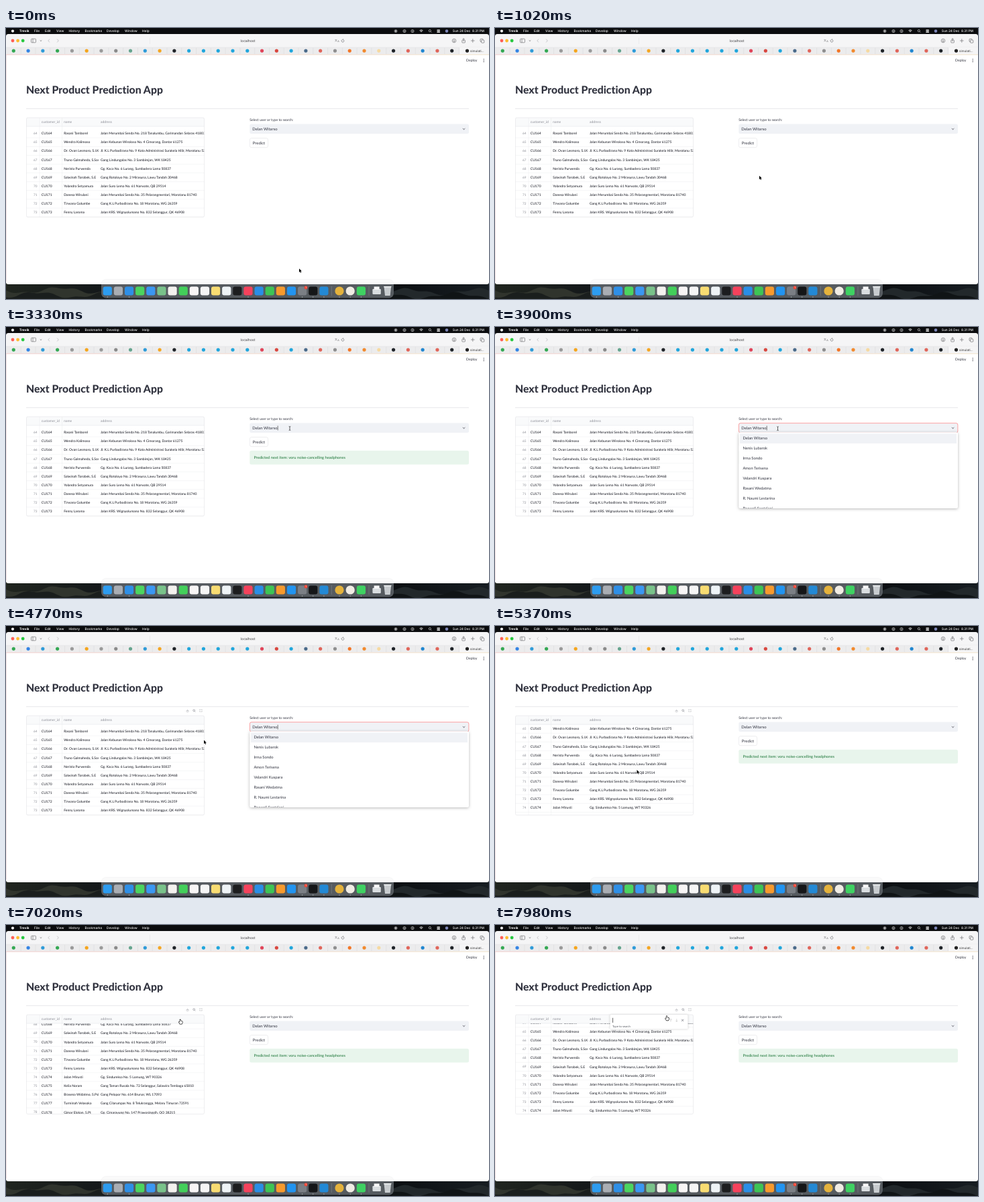
An HTML page with a canvas that plays this animation: 720x405 px, repeating every 8000 ms.

```html
<!DOCTYPE html>
<html lang="en">
<head>
<meta charset="utf-8">
<title>Next Product Prediction App</title>
<style>
html, body { margin: 0; width: 100%; height: 100%; overflow: hidden; background: #fff; }
canvas { display: block; width: 720px; height: 405px; }
</style>
</head>
<body>
<canvas id="stage"></canvas>
<script>
const W = 720, H = 405, LOOP = 8000;
const canvas = document.getElementById('stage');
const g = canvas.getContext('2d');
const dpr = window.devicePixelRatio || 1;
canvas.width = W * dpr;
canvas.height = H * dpr;

const LATO = 'Lato, "Open Sans", sans-serif';
const UI = 'Inter, Roboto, sans-serif';
const INK = '#31333f', DARK = '#20222b', RED = '#ff4b4b', FIELD = '#f0f2f6', CHROME = '#f5f5f6';

const USER = 'Delan Witarso';
const FIRST = 64, ROW = 13.125;
const rows = [
  ['Rasani Tamborel', 'Jalan Merumbai Senda No. 218 Tanalumbu, Garimandan Selaras 41803'],
  ['Wendra Kalimoso', 'Jalan Kebunan Wiroloso No. 4 Cimorang, Dantar 61275'],
  ['Dr. Ovan Lesmoro, S.I.Kom', 'Jl. K.L Purbodirana No. 9 Kota Administrasi Surakela Hilir, Morotanu 52816'],
  ['Truno Galmaheda, S.Sos', 'Gang Lindungalas No. 3 Sambirejan, WK 18425'],
  ['Nerista Purwenda', 'Gg. Kaca No. 6 Lurang, Sumbadera Lama 50837'],
  ['Salwinah Torobek, S.E', 'Gang Rotoloyo No. 2 Mirasuna, Lawu Tandah 30468'],
  ['Yolandra Setyamura', 'Jalan Suro Lema No. 61 Narwate, QB 29514'],
  ['Danesa Wirulani', 'Jalan Merumbai Senda No. 35 Pelarangmentari, Morotanu 81740'],
  ['Tirwana Golumbe', 'Gang K.L Purbodirana No. 18 Morotanu, WG 26359'],
  ['Fenny Laroma', 'Jalan KRS. Wignyolumano No. 832 Selanggur, QK 46908'],
  ['Jolan Mirusti', 'Gg. Sindureksa No. 5 Lomung, WT 90326'],
  ['Kelia Noram', 'Gang Taman Rusala No. 72 Selanggur, Salawira Tembaga 65810'],
  ['Brasena Widatmo, S.Psi', 'Gang Pelopor No. 614 Brunar, WL 17093'],
  ['Turminah Velasoka', 'Gang Cilarumpas No. 8 Telukrangga, Melaru Timuran 72591'],
  ['Gimar Elokan, S.Pt', 'Gg. Cimarayung No. 147 Prawosinggih, QO 38215'],
  ['Lestuti Margonesa', 'Jl. Letnan Wirasuta No. 3 Randumelih, WB 41657'],
  ['Tgk. Rumani Besarowo', 'Jl. Cilarumpas No. 9 Lomuhon, WT 20846'],
  ['Kirnawa Sadelumo, M.Ak', 'Jl. KH Ruwan Dasela No. 20 Kunjar, QC 93148'],
  ['Imelra Katunsi', 'Gg. Kebunan Wiroloso No. 71 Lau-Rau, WI 56230'],
  ['Yuni Parobek', 'Jalan Pelopor No. 7 Wagerang, Morotanu 13874'],
  ['Gerry Lomasu', 'Jl. Wongsarena No. 265 Lorok, Pasuna 78041']
];
const options = [USER, 'Nenis Lubarok', 'Irma Sondo', 'Amon Terisena', 'Velandri Kuspara',
  'Rasani Wedatma', 'R. Naumi Lestarina', 'Bonardi Septalani'];

// Keyframes: [ms, values...]
const cursorPath = [[480, 437, 359.5], [1290, 379, 172.5], [2700, 379, 172.5], [3200, 423, 151.5],
  [3850, 423, 151.5], [4650, 295, 170.5], [4800, 295, 170.5], [5250, 211.5, 215], [5790, 211.5, 215],
  [6400, 250, 149.2], [6800, 250, 149.2], [7380, 280, 126.5], [7600, 280, 126.5], [7960, 256, 136.5]];
const scrollPath = [[5200, 0], [5370, 17], [5640, 48], [5790, 48], [6430, 138.3], [6650, 138.3], [7300, 11.3]];

const T = { run: 1440, done: 2400, focus: 3300, open: 3390, close: 4950, tools: 4640, search: 7500 };

function track(keys, t) {
  if (t <= keys[0][0]) return keys[0].slice(1);
  for (let i = 1; i < keys.length; i++) {
    const a = keys[i - 1], b = keys[i];
    if (t < b[0]) {
      const p = (t - a[0]) / (b[0] - a[0]);
      const e = p * p * (3 - 2 * p);
      return a.slice(1).map((v, k) => v + (b[k + 1] - v) * e);
    }
  }
  return keys[keys.length - 1].slice(1);
}

function rect(x, y, w, h, color, r = 0) {
  g.fillStyle = color;
  g.beginPath();
  g.roundRect(x, y, w, h, r);
  g.fill();
}

function frame(x, y, w, h, color, r = 0, lw = 0.5) {
  g.strokeStyle = color;
  g.lineWidth = lw;
  g.beginPath();
  g.roundRect(x, y, w, h, r);
  g.stroke();
}

function dot(x, y, r, color) {
  g.fillStyle = color;
  g.beginPath();
  g.arc(x, y, r, 0, 7);
  g.fill();
}

function ring(x, y, r, color, lw = 0.6, from = 0, to = 7) {
  g.strokeStyle = color;
  g.lineWidth = lw;
  g.beginPath();
  g.arc(x, y, r, from, to);
  g.stroke();
}

function line(pts, color, lw = 0.6) {
  g.strokeStyle = color;
  g.lineWidth = lw;
  g.beginPath();
  for (let i = 0; i < pts.length; i += 2) g.lineTo(pts[i], pts[i + 1]);
  g.stroke();
}

function text(s, x, y, size, color = INK, font = LATO, weight = 400, align = 'left') {
  g.font = `${weight} ${size}px ${font}`;
  g.fillStyle = color;
  g.textAlign = align;
  g.fillText(s, x, y + size * 0.34);
}

function clip(x, y, w, h, draw) {
  g.save();
  g.beginPath();
  g.rect(x, y, w, h);
  g.clip();
  draw();
  g.restore();
}

function chevron(x, y, w, h, color, lw = 0.7) {
  line([x - w, y - h, x, y + h, x + w, y - h], color, lw);
}

function lens(x, y, r, color) {
  ring(x - r * 0.3, y - r * 0.3, r, color);
  line([x + r * 0.45, y + r * 0.45, x + r * 1.3, y + r * 1.3], color);
}

function menuBar() {
  rect(0, 0, W, 12, '#0b0c0e');
  dot(10, 4.6, 2.1, '#f2f2f2');
  text('Trevik', 20, 4.6, 4.8, '#fff', UI, 700);
  [['File', 42], ['Edit', 58], ['View', 75], ['History', 93.5], ['Bookmarks', 117.5],
    ['Develop', 150], ['Window', 177], ['Help', 203]]
    .forEach(([s, x]) => text(s, x, 4.6, 4.8, '#f4f4f4', UI, 500));
  const c = '#eee';
  ring(581, 4.6, 2, c);
  dot(581, 4.6, 1.1, c);
  ring(594, 4.6, 2.1, c);
  ring(594, 4.6, 0.9, c, 0.5);
  ring(606, 4.6, 2.1, c);
  line([605.3, 3.6, 607, 4.6, 605.3, 5.6], c);
  [1.2, 2.5, 3.8].forEach(r => ring(619, 6.6, r, c, 0.8, -2.3, -0.85));
  lens(632.3, 4.6, 1.6, c);
  rect(642.3, 2.4, 4.8, 1.8, c, 0.9);
  rect(642.3, 5, 4.8, 1.8, c, 0.9);
  dot(657, 4.6, 2.3, '#7d86b8');
  text('Sun 24 Dec  8.31 PM', 713, 4.6, 4.8, '#f4f4f4', UI, 500, 'right');
}

function toolbar() {
  rect(0, 9, W, 40, CHROME, [3.5, 3.5, 0, 0]);
  ['#ff5f57', '#febc2e', '#28c840'].forEach((c, i) => dot(10 + i * 7.6, 19, 2.4, c));
  const c = '#5c5c5e', pale = '#b4b4b6';
  frame(37.5, 16.2, 7, 5.6, c, 1, 0.6);
  line([40, 16.2, 40, 21.8], c);
  chevron(52, 19, 1.3, 0.6, c);
  line([65, 16.6, 62.8, 19, 65, 21.4], pale, 0.7);
  line([76.2, 16.6, 78.4, 19, 76.2, 21.4], pale, 0.7);
  line([214.5, 14.5, 214.5, 24], '#e4e4e6');
  text('localhost', 360.5, 19, 5.1, '#3c3c3e', UI, 400, 'center');
  text('文', 490, 18.8, 3.8, c, '"Noto Sans CJK SC", "Noto Sans CJK", sans-serif');
  text('A', 494.3, 19.5, 3.6, c, UI);
  ring(502, 19.2, 1.9, c, 0.6, -0.6, 4.6);
  line([502, 16.4, 503.3, 17.3, 502, 18.2], c, 0.5);
  ring(668, 19, 2.8, c);
  line([668, 17.4, 668, 20.4], c);
  chevron(668, 19.9, 1.1, 0.5, c);
  frame(679.8, 18, 4.6, 4, c, 0.7, 0.6);
  line([682.1, 20, 682.1, 15.6], c);
  line([680.8, 16.8, 682.1, 15.5, 683.4, 16.8], c);
  line([693, 19, 698.6, 19], c);
  line([695.8, 16.2, 695.8, 21.8], c);
  frame(707, 16.3, 4.2, 4.2, c, 0.8, 0.6);
  rect(708.4, 17.8, 4.6, 4.6, CHROME, 0.8);
  frame(708.6, 18, 4.2, 4.2, c, 0.8, 0.6);
}

const tabColors = ['#34a853', '#3584e4', '#2f9bd8', '#34a853', '#9a9a9a', '#f5a51d', '#9a9a9a', '#8a8a8a',
  '#66a58f', '#2f9bd8', '#f5a623', '#1f2328', '#20a6dc', '#20a6dc', '#20a6dc', '#20a6dc', '#20a6dc', '#e0455a',
  '#d9473f', '#20a6dc', '#4a6a8a', '#e0655a', '#8f8f8f', '#f37626', '#f28a2e', '#f6d9a0', '#1f2328', '#e0655a',
  '#1f86d0', '#e0655a', '#1f2328'];

function tabs() {
  rect(0, 29, W, 10.5, '#ececed');
  line([0, 29, W, 29], '#dedee0', 0.5);
  tabColors.forEach((c, i) => {
    const x = 11.3 + i * 21.78;
    dot(x, 34.1, 2.6, c);
    line([x + 10.9, 29.5, x + 10.9, 39], '#d8d8da', 0.5);
  });
  rect(676, 29, 44, 11, CHROME);
  dot(687.5, 34.1, 2.6, '#222');
  text('simulati...', 692, 34.1, 4.6, '#333', UI);
}

function pageHead(t) {
  rect(0, 39.5, W, 343.5, '#fff', [0, 0, 3.5, 3.5]);
  const bar = g.createLinearGradient(0, 0, W, 0);
  bar.addColorStop(0, '#e9b9b9');
  bar.addColorStop(1, '#ecd9b8');
  rect(0, 39.4, W, 0.9, bar);
  rect(0, 40, 0.7, 339, '#ecd4d6');
  text('Deploy', 686, 48.5, 5.2);
  [-1.9, 0, 1.9].forEach(d => dot(712.2, 48.5 + d, 0.6, INK));
  if (t >= T.run && t < T.done) {
    const c = '#8d8f98', k = Math.floor(t / 130) % 2 ? 1 : -1;
    dot(626, 45.3, 0.9, c);
    line([622.6, 47 - k * 0.4, 626, 47.2, 629.4, 47 + k * 0.4], c, 0.8);
    line([626, 46.5, 626, 49.5], c, 1);
    line([625 - k * 0.3, 52.6, 626, 49.4, 627 - k * 0.3, 52.6], c, 0.8);
    text('RUNNING...', 634, 48.5, 4.5, '#a3a5ad');
    text('Stop', 666, 48.5, 5.2);
  }
  text('Next Product Prediction App', 30, 92.6, 15.8, INK, LATO, 800);
  line([30, 120.6, 690, 120.6], '#d8d9dd', 0.6);
}

function searchPanel() {
  g.save();
  g.shadowColor = 'rgba(0,0,0,.22)';
  g.shadowBlur = 3 * dpr;
  rect(171.5, 134, 116, 21.5, '#fff', 1.5);
  g.restore();
  line([175.6, 138.8, 175.6, 146], '#222', 0.7);
  text('Type to search', 175, 151.4, 4.2, '#55575f');
  const c = '#777982';
  line([262, 144.5, 262, 140.5], '#bbb');
  line([260.7, 141.8, 262, 140.4, 263.3, 141.8], '#bbb');
  line([270.8, 140.3, 270.8, 144.4], '#bbb');
  line([269.5, 143.1, 270.8, 144.5, 272.1, 143.1], '#bbb');
  line([278, 140.8, 281.2, 144], c, 0.8);
  line([281.2, 140.8, 278, 144], c, 0.8);
}

function table(t) {
  const s = track(scrollPath, t)[0];
  const grid = '#e9eaed', dim = '#8b8d96';
  const cell = (str, x, y) => text(str, x, y, 5, DARK, LATO, 500);
  clip(30.5, 147, 265, 135.5, () => {
    rows.forEach(([name, addr], i) => {
      const y = 157.5 + i * ROW - s, id = FIRST + i;
      if (y < 138 || y > 292) return;
      line([30, y + 6.56, 296, y + 6.56], grid, 0.45);
      text(id, 46.6, y, 4.8, dim, LATO, 400, 'right');
      cell('CU1' + id, 52.8, y);
      clip(84, 140, 54.2, 145, () => cell(name, 86.2, y));
      cell(addr, 141, y);
    });
  });
  rect(30.5, 134, 265, 13, '#f9fafb');
  text('customer_id', 52.8, 140.4, 5, dim);
  text('name', 86.2, 140.4, 5, dim);
  text('address', 141, 140.4, 5, dim);
  line([30.5, 147, 295.5, 147], '#dfe0e4', 0.5);
  [50, 83.6].forEach(x => line([x, 134, x, 282.5], grid, 0.5));
  frame(30.5, 134, 265, 148.6, '#dcdde1', 2, 0.5);
  if (t >= T.tools) {
    const c = '#7e8089';
    line([269, 127.3, 270.6, 125.6, 272.2, 127.3], c, 0.7);
    line([269, 128.3, 272.2, 128.3], c, 0.4);
    lens(280.6, 126.6, 1.4, c);
    [[-1, -1], [1, -1], [-1, 1], [1, 1]].forEach(([a, b]) =>
      line([290.5 + a * 0.6, 126.5 + b * 1.6, 290.5 + a * 1.6, 126.5 + b * 1.6, 290.5 + a * 1.6, 126.5 + b * 0.6], c, 0.5));
  }
  if (t >= T.search) searchPanel();
}

function form(t, x, y) {
  const open = t >= T.open && t < T.close;
  text('Select user or type to search:', 363.3, 137.4, 5.1);
  rect(363.3, 143.6, 326.7, 14.4, FIELD, 2.5);
  if (open) frame(363.4, 143.7, 326.5, 14.2, RED, 2.5, 0.5);
  text(USER, 367.3, 151, 5.9);
  if (t >= T.focus && t < T.close) {
    const w = g.measureText(USER).width;
    line([367.9 + w, 147.6, 367.9 + w, 154.4], '#222', 0.6);
  }
  chevron(682.6, 150.9, 1.7, 0.8, INK, 0.8);

  const hot = overButton(x, y) || (t >= T.run && t < T.focus);
  frame(363.4, 164.6, 27.2, 14, hot ? RED : '#dcdde1', 2.5, 0.5);
  text('Predict', 377, 171.6, 5.9, hot ? RED : INK, LATO, 400, 'center');

  if (t >= T.done) {
    rect(363.3, 184.8, 326.7, 20.6, '#e8f5ec', 2.5);
    text('Predicted next item: voru noise-cancelling headphones', 369.4, 195.1, 5.7, '#177233');
  }
  if (open) menu();
}

function menu() {
  g.save();
  g.shadowColor = 'rgba(0,0,0,.28)';
  g.shadowBlur = 4 * dpr;
  g.shadowOffsetY = dpr;
  rect(363.3, 157.2, 326.7, 113.8, '#fff', 2.5);
  g.restore();
  rect(365, 159.4, 323, 14.6, FIELD);
  clip(363, 158, 327, 112.8, () =>
    options.forEach((s, i) => text(s, 369.4, 166.5 + i * 15, 5.8)));
}

function ridge(x0, x1, base, phase, color) {
  g.fillStyle = color;
  g.beginPath();
  g.moveTo(x0, H);
  for (let x = x0; x <= x1; x += 3) g.lineTo(x, base + Math.sin(x / 17 + phase) * 4 + Math.sin(x / 6) * 1.5);
  g.lineTo(x1, H);
  g.fill();
}

function wallpaper() {
  const sky = g.createLinearGradient(0, 0, W, 0);
  sky.addColorStop(0, '#20251f');
  sky.addColorStop(0.2, '#14181a');
  sky.addColorStop(0.8, '#0c0f12');
  sky.addColorStop(1, '#171d22');
  rect(0, 375, W, 30, sky);
  ridge(0, 144, 392, 0, '#30342d');
  ridge(0, 144, 399, 2, '#1a1e1d');
  ridge(576, W, 394, 1, '#22282b');
  ridge(576, W, 400, 3, '#101416');
}

const dockColors = ['#2d9cf0', '#a9adb3', '#2f8fe6', '#4cd45f', '#3b97f2', '#79c28a', '#f3f1ee', '#43cf5a', '#f7f5f5',
  '#f5f5f5', '#f8dc72', '#eef3f6', '#1c1d1f', '#f5425c', '#2a8ee6', '#3ec455', '#f79a2d', '#2294f0', '#7b7f85',
  '#151618', '#2389d5'];

function dock() {
  clip(140, 374, 442, 9, () => {
    rect(142, 375.6, 436, 28, '#fafafa', 7);
    frame(142, 375.6, 436, 28, '#efeff0', 7, 0.5);
  });
  clip(140, 383, 442, 22, () => rect(142, 375.6, 436, 28, '#565b60', 7));
  const icon = (x, c) => rect(x - 6.6, 386.4, 13.2, 13.2, c, 3);
  dockColors.forEach((c, i) => icon(151.3 + i * 16.13, c));
  dot(447, 388, 2.4, '#f4402f');
  text('1', 447, 388, 3.4, '#fff', UI, 500, 'center');
  dot(497, 393, 6.6, '#e4b23c');
  dot(513.2, 393, 6.6, '#f0ece4');
  icon(529.4, '#3fd162');
  [485.3, 541].forEach(x => line([x, 386, x, 400], '#888c90', 0.5));
  rect(546.4, 390, 12.4, 8, '#d9dde0', 1.2);
  rect(548.6, 386.5, 8, 4.5, '#f7f7f7');
  g.fillStyle = '#cdd1d4';
  g.beginPath();
  [[563.6, 387], [574, 387], [572.6, 400], [565, 400]].forEach(p => g.lineTo(...p));
  g.fill();
  rect(563, 386, 11.6, 1.4, '#eceeef', 0.7);
  [566.5, 568.8, 571.1].forEach(x => line([x, 388.5, x, 398.5], '#aeb3b7', 0.4));
  [151.3, 183.6, 361, 441.6, 457.7, 473.9, 497, 513.2, 529.4].forEach(x => dot(x, 402, 0.6, '#e6e6e6'));
}

function overButton(x, y) {
  return x > 363 && x < 391 && y > 164 && y < 179;
}

function shape(pts, fill, edge, lw) {
  g.beginPath();
  for (let i = 0; i < pts.length; i += 2) g.lineTo(pts[i], pts[i + 1]);
  g.closePath();
  g.lineJoin = 'round';
  g.strokeStyle = edge;
  g.lineWidth = lw;
  g.stroke();
  g.fillStyle = fill;
  g.fill();
  g.lineJoin = 'miter';
}

function pointer(t, x, y) {
  g.save();
  g.translate(x, y);
  const inField = x > 363 && x < 690 && y > 143.6 && y < 158;
  const inTools = t >= T.tools && x > 250 && y > 122 && y < 146;
  if (inField) {
    line([-1.3, -3, 0, -2.4, 1.3, -3], '#222', 0.7);
    line([-1.3, 3, 0, 2.4, 1.3, 3], '#222', 0.7);
    line([0, -2.4, 0, 2.4], '#222', 0.7);
  } else if (overButton(x, y) || inTools) {
    shape([-0.5, -0.4, 0.5, -0.4, 0.7, 1.8, 3, 2.4, 3.2, 4, 2.4, 6, -0.4, 6, -2, 3.4, -1.5, 2.8, -0.5, 3.6],
      '#fff', '#111', 1.3);
  } else {
    shape([0, 0, 0, 5.6, 1.3, 4.5, 2.2, 6.4, 3.1, 6, 2.2, 4.1, 3.9, 4], '#000', '#fff', 0.8);
  }
  g.restore();
}

function draw(t) {
  g.setTransform(dpr, 0, 0, dpr, 0, 0);
  g.textRendering = 'geometricPrecision';
  g.letterSpacing = '0.01px'; // any spacing turns ligatures off
  const [x, y] = track(cursorPath, t);
  wallpaper();
  menuBar();
  toolbar();
  tabs();
  pageHead(t);
  table(t);
  form(t, x, y);
  dock();
  pointer(t, x, y);
}

const start = performance.now();
function tick() {
  draw((performance.now() - start) % LOOP);
  requestAnimationFrame(tick);
}
tick();
</script>
</body>
</html>
```
